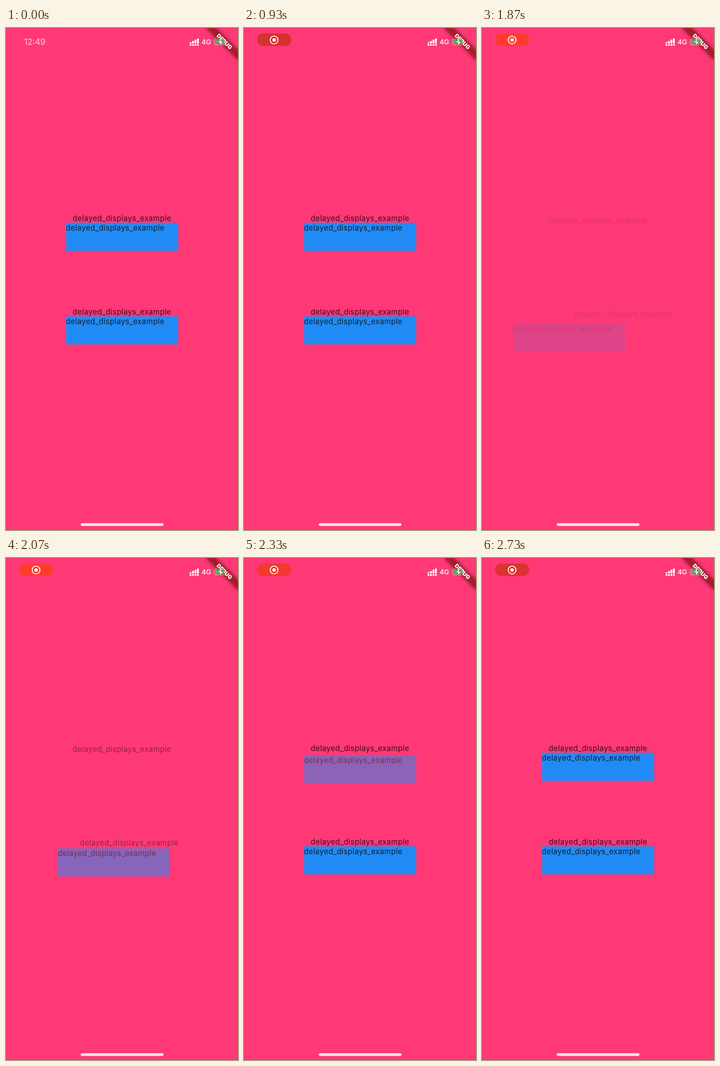
An HTML page for the animation above (2.79 s loop, 509 by 1100 pixels).

```html
<!DOCTYPE html>
<html lang="en">
<head>
<meta charset="utf-8">
<title>Delayed display</title>
<style>
  html, body { margin: 0; width: 100%; height: 100%; overflow: hidden; background: #ff3976; }
  svg { display: block; width: 509px; height: 1100px; font-family: Inter, sans-serif; }
  .label { font-size: 16.6px; letter-spacing: .38px; fill: #000; fill-opacity: .76; }
  .mid { text-anchor: middle; }
</style>
</head>
<body>
<svg viewBox="0 0 509 1100">
  <defs>
    <filter id="blur" x="-30%" y="-150%" width="160%" height="400%"><feGaussianBlur stdDeviation="4.5"/></filter>
  </defs>
  <rect width="509" height="1100" fill="#ff3976"/>

  <g id="title1"><text class="label mid" x="254.5" y="423">delayed_displays_example</text></g>
  <g id="box1">
    <rect x="131.8" y="426.8" width="246" height="61.5" fill="#218bf5"/>
    <text class="label" x="131.3" y="443.8">delayed_displays_example</text>
  </g>
  <g id="title2"><text class="label mid" x="254.5" y="628">delayed_displays_example</text></g>
  <g id="box2">
    <rect x="131.8" y="631.8" width="246" height="61.5" fill="#218bf5"/>
    <text class="label" x="131.3" y="648.8">delayed_displays_example</text>
  </g>

  <g transform="translate(509 0) rotate(45)">
    <rect x="-49.2" y="34.4" width="98.4" height="14.8" opacity=".5" filter="url(#blur)"/>
    <rect x="-49.2" y="34.4" width="98.4" height="14.8" fill="#b71c1c" fill-opacity=".63"/>
    <text class="mid" y="46.2" font-size="12.2" font-weight="900" fill="#fff">DEBUG</text>
  </g>

  <g fill="#fff">
    <text id="clock" x="39.5" y="37" font-size="18" font-weight="500" fill-opacity=".65">12:49</text>
    <g id="bars"></g>
    <text x="429" y="36.2" font-size="15" font-weight="500">4G</text>
    <rect x="457.2" y="24.2" width="24" height="13.2" rx="3.6" fill="none" stroke="#fff" stroke-opacity=".5" stroke-width="1.2"/>
    <path d="M483 28.5q2 2.3 0 4.6z" fill-opacity=".5"/>
    <rect x="459" y="26" width="20.5" height="9.6" rx="2" fill="#34c759"/>
    <path d="M474 22L464.5 32H470L467.5 40L477 29.7H471.4z" stroke="#a5243a" stroke-width=".8"/>
    <rect x="164" y="1085" width="181.5" height="6.2" rx="3" fill="#f3e1e7"/>
  </g>

  <g id="pill">
    <rect id="pillFill" x="29" y="12" width="74.5" height="27.5" rx="13"/>
    <circle cx="66" cy="26.3" r="8.6" fill="none" stroke="#fff" stroke-width="1.9"/>
    <circle cx="66" cy="26.3" r="3.8" fill="#fff"/>
  </g>
</svg>
<script>
const LOOP = 2790, RESTART = 1770, DURATION = 500, SLIDE = 0.35;
const $ = id => document.getElementById(id);
const clamp = v => Math.min(1, Math.max(0, v));

// Each entry slides in from a fraction of its own size while fading in.
const entries = [
  { id: 'title1', start: 1800, dx: 0, dy: 20.5 },
  { id: 'title2', start: 1800, dx: 216, dy: 20.5 },
  { id: 'box2', start: 1800, dx: -246, dy: 61.5 },
  { id: 'box1', start: 2072, dx: 0, dy: 61.5 },
];

$('bars').innerHTML = [3, 5.5, 8.5, 11].map((h, i) => {
  const x = 402.8 + i * 5.4;
  return `<rect x="${x}" y="${34 - h}" width="4" height="${h}" rx="1"/>
    <rect x="${x}" y="35.2" width="4" height="3.8" rx="1"/>`;
}).join('');

function draw(t) {
  for (const { id, start, dx, dy } of entries) {
    const p = t < RESTART ? 1 : clamp((t - start) / DURATION);
    const rest = SLIDE * (1 - p) ** 2;
    $(id).setAttribute('transform', `translate(${dx * rest} ${dy * rest})`);
    $(id).setAttribute('opacity', p);
  }
  const shown = clamp((t - 30) / 250);
  $('pill').setAttribute('opacity', shown);
  $('clock').setAttribute('opacity', 1 - shown);
  const glow = (1 + Math.cos((t - 1970) / 1000 * Math.PI)) / 2;
  $('pillFill').setAttribute('fill', `rgb(${214 + 41 * glow}, ${50 + 9 * glow}, 48)`);
}

const origin = performance.now();
function tick() {
  draw((performance.now() - origin) % LOOP);
  requestAnimationFrame(tick);
}
tick();
</script>
</body>
</html>
```
